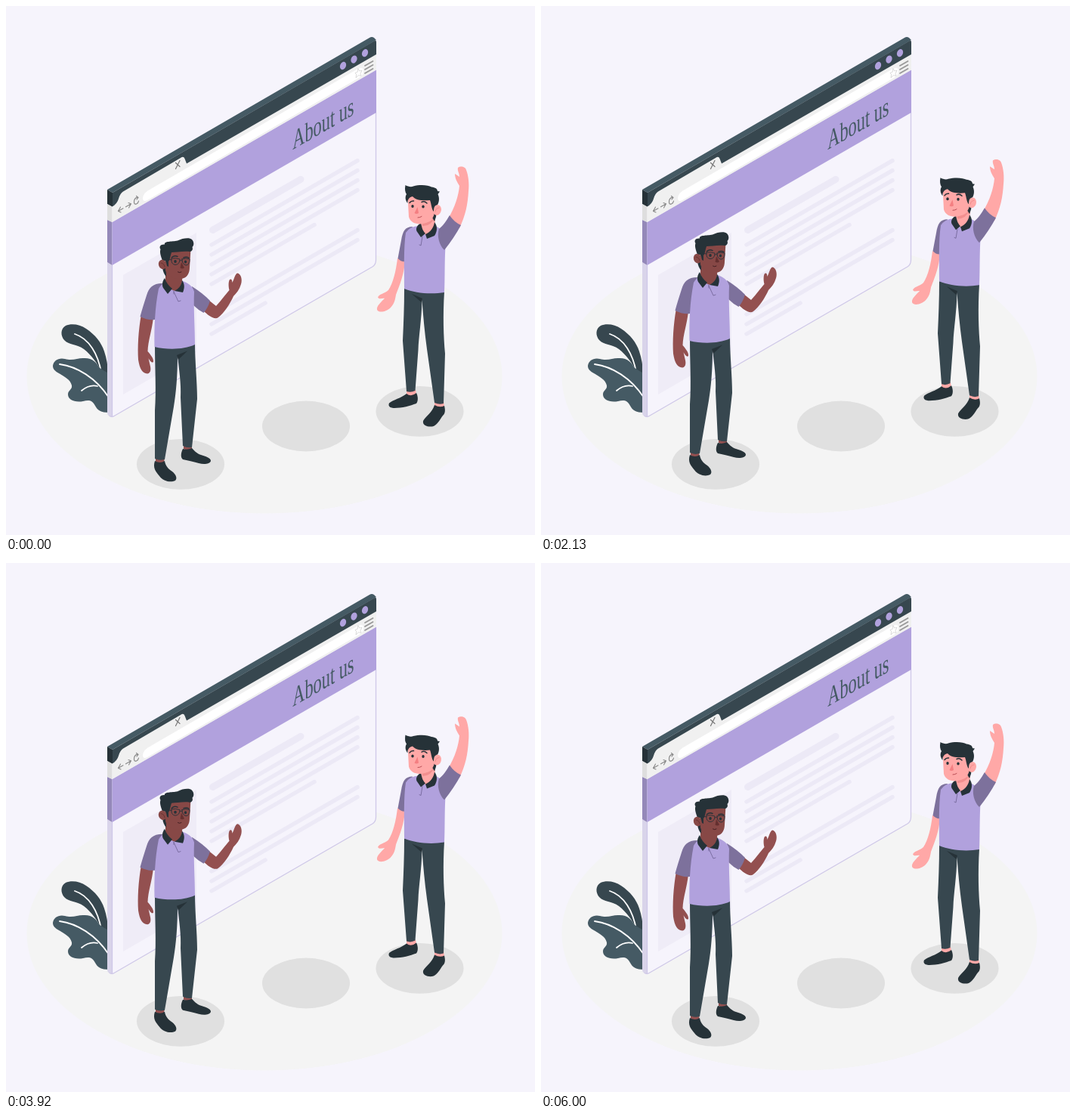
Animation of 700 by 700 pixels, one loop 6.04 s. Source, as an HTML page with a canvas:

```html
<!DOCTYPE html>
<html lang="en">
<head>
<meta charset="utf-8">
<title>About us</title>
<style>
html, body { margin: 0; width: 100%; height: 100%; overflow: hidden; background: #f6f4fc; }
canvas { display: block; width: 700px; height: 700px; }
</style>
</head>
<body>
<canvas id="stage"></canvas>
<script>
const canvas = document.getElementById('stage');
const ctx = canvas.getContext('2d');
const ratio = window.devicePixelRatio || 1;
canvas.width = canvas.height = 700 * ratio;

const LOOP = 6040, CYCLE = 6000, LIFT = 13.6;
const SLOPE = 0.577; // isometric edge
const C = {
  bg: '#f6f4fc', floor: '#f4f4f4', shadow: '#e0e0e0',
  lilac: '#b1a1dd', sleeve: '#7d719c', side: '#9488b9', pale: '#ece9f6',
  ink: '#263238', slate: '#37474f', steel: '#455a64',
  brown: '#874846', arm: '#935050', pink: '#ffa8a7'
};

const cache = new Map();
function path(d) {
  if (!cache.has(d)) cache.set(d, new Path2D(d));
  return cache.get(d);
}
function fill(color, d) {
  ctx.fillStyle = color;
  ctx.fill(path(d));
}
function line(color, width, d) {
  ctx.strokeStyle = color;
  ctx.lineWidth = width;
  ctx.lineCap = ctx.lineJoin = 'round';
  ctx.stroke(path(d));
}
function oval(color, x, y, rx, ry, turn = 0) {
  ctx.fillStyle = color;
  ctx.beginPath();
  ctx.ellipse(x, y, rx, ry, turn, 0, Math.PI * 2);
  ctx.fill();
}

function floor() {
  ctx.fillStyle = C.bg;
  ctx.fillRect(0, 0, 700, 700);
  oval(C.floor, 342, 490, 314.5, 181.5);
  for (const [x, y] of [[231, 606.3], [397, 556], [547.5, 536.3]]) oval(C.shadow, x, y, 58, 33.4);
}

function plant() {
  fill(C.slate, 'M135 487L126 485C121 472 113 462 103 454C94 447 83 449 77 442C72 436 72 427 79 423C86 420 98 421 106 427C118 435 126 445 130 457C133 466 135 476 135 487Z');
  line('#fff', 1.8, 'M91 434C110 440 122 461 126 485');
  fill(C.steel, 'M62 476C63 469 70 465 78 467C88 470 94 466 102 466C114 465 120 472 123 478C128 482 132 484 136 486V538C126 538 121 535 118 529C114 521 109 521 102 523C91 525 82 521 82 514C82 508 88 508 87 502C85 494 78 491 70 486C65 483 62 481 62 476Z');
  line('#fff', 1.8, 'M71 474C94 477 119 492 136 518');
  line('#fff', 1.8, 'M100 509C106 504 113 501 121 503');
}

function bar(x, y, x2, width) {
  line(C.pale, width, `M${x} ${y}L${x2} ${y - (x2 - x) * SLOPE}`);
}

function screen() {
  // page
  fill('#d9d4ea', 'M134 339L140.5 343V544.5L136 542Q134 541 134 538Z');
  fill(C.bg, 'M140.5 343L490 141V336Q490 342 485 345L140.5 544Z');
  line('#cfc8e8', 1.3, 'M489.5 141V336Q489.5 342 485 345L144 542Q140.5 544.5 137 542.5M140.500 343V543');

  // header
  fill(C.side, 'M134 283L140.5 286V343L134 339Z');
  fill(C.lilac, 'M140.5 286L490 84.5V141L140.5 343Z');

  // frame
  fill(C.steel, 'M134 243L481 42Q484 40 487 42L490 45L141 247Z');
  fill(C.ink, 'M134 243L141 247V266L134 262Z');
  fill(C.slate, 'M141 247L487 46.5Q490 44.5 490 48V65L141 267Z');
  [446, 460.5, 475].forEach((x, i) => oval(C.lilac, x, 79 - i * 8.4, 3.9, 5.3, 0.4));

  // toolbar
  fill('#dedede', 'M134 262L140.5 265.5V286L134 283Z');
  fill('#f0f0f0', 'M140.5 265.5Q147 262 149 255Q151 248 155 245.5L231 201Q235 198 236.5 202L239 208.6L490 64V84.5L140.5 286Z');
  fill('#fff', 'M190 243L466 83Q473 80 473 86Q473 91 468 94.5L187 257Q181 260 181 254Q182 247 190 243Z');
  line('#777', 1.2, 'M224.5 207.5L230 212.5M230 204.5L224.5 215.5');
  line('#888', 1.1, 'M148.5 271.5L155 267.8M151.5 266L148.5 271.5L152 273M158.5 265.8L165.5 261.8M162 260.5L165.5 261.8L162.5 267');
  line('#888', 1.2, 'M174.5 253.5C171 253 169 257 169.5 260C170 264 175 262 175.5 258M172.5 251.5L175 253.5L173 256');
  line('#d2d2d2', 0.8, 'M466 83L467.8 86L471 85.4L469 89.5L470 92.3L466.4 91.8L463 95L463.7 90.8L462 88.6L465 87.3Z');
  for (let y = 79; y < 92; y += 5) line('#999', 1.8, `M475 ${y}L485.5 ${y - 6}`);

  ctx.save();
  ctx.transform(0.62, -0.358, 0, 1, 379.3, 190.3);
  ctx.font = '36px "Liberation Serif", "Times New Roman", serif';
  ctx.fillStyle = C.steel;
  ctx.fillText('About us', 0, 0);
  ctx.restore();

  // content
  fill('#efecf7', 'M155 356L252 300V458L155 514Z');
  bar(273.5, 296.5, 390, 9);
  for (let i = 0; i < 5; i++) bar(272, 316 + i * 13, i < 4 ? 465 : 408, 5.4);
  for (let i = 0; i < 3; i++) bar(272, 408 + i * 13, i < 2 ? 465 : 343, 5.4);
}

function leftMan() {
  // legs
  fill(C.arm, 'M198 596H210L209 604Q203 606 198 603ZM235 579H246L246 587Q240 589 235 586Z');
  fill(C.ink, 'M197 602C194 611 198 616 203 622C208 629 218 631 224 628C227 625 225 620 220 616C214 612 211 608 210 602Q204 606 197 602Z');
  fill(C.ink, 'M234 586C231 592 231 598 234 600C242 602 249 603 255 605C262 607 270 606 271 602C271 598 264 596 258 594C252 592 249 588 246 585Q240 588 234 586Z');
  fill(C.slate, 'M197 449L250 446C250 470 253 498 253 520L246 584Q239 585 234 582L231 518C232 500 229 482 227 462C227 490 225 512 222 530L210 600Q203 602 197 599L197 535C199 510 197 478 197 449Z');
  fill(C.ink, 'M226 462L240 456.5L228 468Z');

  // arms
  fill(C.arm, 'M179 408C175 430 174 452 175 468C177 480 180 486 187 486.5C191 486 192 482 191 477L188.5 466C190 469 193 473 195 471C196 467 191 461 187.5 457C188 443 193 430 195 412Z');
  fill(C.sleeve, 'M207 367C194 367 189 373 186 383C183 392 180 402 177.5 411Q187 416 197 415L204 400Z');
  fill(C.arm, 'M268 389L278 397C286 388 291 381 295.5 376C294 370 294.5 364 296 362Q299 360 299.5 366C302 361 303 355 306 353.5C311 354 313 362 311 368C309 375 305 380 301 384C296 395 288 407 281 412C276 416 267 409 262 404Z');
  fill(C.sleeve, 'M246 371C256 377 264 384 270 390Q267 400 261.5 406Q254 402 248 396Z');

  // shirt
  fill(C.lilac, 'M196.5 451C196 425 197 399 202 374Q206 367 213 364L234 364C242 367 247 371 249 378C248 400 250 425 250 448C235 455 213 455 196.5 451Z');
  fill(C.brown, 'M211 349V364C214 373 220 377 225 377C231 374 234 369 233 356Z');
  fill(C.ink, 'M210 360C207 364 206 369 208 373L214 381L220 374C215 370 212 366 210 360ZM233 363C236 367 237 372 234 379L223 377C229 374 232 370 233 363Z');
  line('#75689b', 0.9, 'M222 378L228 391L231 390M222 377L222 381');

  // head
  fill(C.ink, 'M207 346L212 346L212 358Q208 354 207 346Z');
  fill(C.brown, 'M210 326L211 350C213 358 222 362 232 361C240 360 243 353 243 346L244.5 321L222 317Z');
  fill(C.ink, 'M207 337C205 331 203 326 204.5 322C202 318 205 315 210 315.5C209 311 219 312 227 310.5C234 307 243 306 246 309C249 312 249 317 246.5 319C248 323 245 325 243 325C234 324 225 326 219 326C217 332 217 336 215 338V345C212 344 212 341 211 337Z');
  oval(C.brown, 207.2, 342, 5.3, 6.3, -0.3);
  line('#5f2f2f', 0.8, 'M205 340Q209 340 210 345');
  line(C.ink, 1.5, 'M219.5 332.5Q223 329.5 227 331.5M235 333Q239 331.5 242 333.5');
  oval(C.ink, 224, 338, 1.8, 2);
  oval(C.ink, 237.5, 338.5, 1.6, 2);
  line(C.ink, 0.9, 'M219 334Q225 333 230 335Q230 342 224 342.5Q218 342 219 334ZM233 335Q238 333 243 335Q243 343 238 343Q233 342 233 335ZM230 337Q231.5 336 233 337M219 336L212 334.5');
  fill('#642f2f', 'M232 339L236 346.5Q233 348.5 230.5 346.5Z');
  line('#421f22', 1, 'M227.5 352Q229.5 353.5 232 352');
}

function rightMan() {
  // legs
  fill(C.pink, 'M530 508H542L543 514Q536 519 530 514ZM567 523H579L580 530Q573 533 567 529Z');
  fill(C.ink, 'M530 513C523 519 512 521 507 525.5C505 530 509 532 514 532C524 532 535 529 543 526C546 522 545 516 543 512Q536 518 530 513Z');
  fill(C.ink, 'M567 528C564 538 556 542 552 549C551 555 557 557 564 556.5C571 555 574 547 578 542C582 539 581 533 580 529Q574 532 567 528Z');
  fill(C.slate, 'M527 374L580 378C578 410 579 438 581 460L579 526Q573 528 567 525L557 454C554 432 552 410 550.5 389C550 415 546 438 545.5 455L541.5 509Q536 512 530 510L525 443C526 420 527 398 527 374Z');
  fill(C.ink, 'M537 381L551 387L549.5 392Z');

  // arms
  fill(C.pink, 'M518 334C516 351 512 367 506 376C500 381 494 381 492 385.5C494 389 499 386 501 387C497 391 490 397 491 402C494 407 504 404 509 399C514 394 515 388 516 382C521 369 527 355 528 336Z');
  fill(C.sleeve, 'M538 292C528 292 525 298 523 310L518.5 334Q523 339 529 338L534 310Z');
  fill(C.lilac, 'M527 374C527 348 526 320 529 300Q534 292 545 291H568C575 294 580 300 582 311C580 335 581 359 580 379C562 382 541 380 527 374Z');
  fill(C.pink, 'M585 281C594 267 599 250 600 238C597 233 594 228 594 222L600 226C600 221 597 218 598 214C602 211 608 213 609 217C612 225 613 235 612 245C611 263 608 277 600 294Z');
  fill(C.sleeve, 'M573 295C578 291 583 284 587 277Q593 286 602 290C596 301 588 313 580 323C573 316 570 304 573 295Z');

  // collar
  fill(C.pink, 'M549 278V292C551 300 555 304 558 303C564 300 568 294 568 280Z');
  fill('#f28f8f', 'M551 287.5Q561 287 567 280Q562 292 551 291Z');
  fill(C.ink, 'M549 287C544 290 542 294 543.5 298L549 306L555 301C551 297 550 292 549 287ZM567 286C571 291 571 298 567 304L557 308L555 302C562 299 566 293 567 286Z');
  line('#75689b', 0.9, 'M551 305L549 317L547 316');

  // head
  fill(C.ink, 'M564 260L571 264L569 279L567 285L564 280Z');
  fill(C.pink, 'M531.5 251L533 279C535 287 544 289.5 552 288C562 286 567 280 567 271L569 248L542 244Z');
  oval(C.pink, 570.5, 270, 5.4, 7, 0.25);
  line('#ee8585', 0.8, 'M568 272Q569 267 573 267');
  fill(C.ink, 'M528.5 237C532 239 536 240 539 238.5C548 236 559 237 563 239.5C568 240 571 242 571 245L574 245.5L571.5 249C574 254 573 260 571 263C567 263 566 267 566 272C563 269 563 262 561 257C552 258 542 257 538 252C533 253 531 257 531.5 261C528 257 528 252 530 249Q527 245 528.5 237Z');
  line(C.ink, 1.5, 'M534 260.5Q536 257.5 539.5 258M550 259.5Q553.5 257.5 557 261');
  oval(C.ink, 538, 265, 1.7, 2);
  oval(C.ink, 552, 265.5, 1.7, 2);
  fill('#f47f82', 'M544.5 266L540.5 274Q543 276 546 274Z');
  line('#b94d55', 1, 'M545 280Q548 280 550 278.5');
}

// straight rise and fall, 0..1..0
function bounce(t, period) {
  return 1 - Math.abs(1 - 2 * (t % period) / period);
}

function lifted(draw, amount) {
  ctx.save();
  ctx.translate(0, -LIFT * amount);
  draw();
  ctx.restore();
}

const start = performance.now();
function frame() {
  const t = Math.min(Math.max(0, performance.now() - start) % LOOP, CYCLE);
  ctx.setTransform(ratio, 0, 0, ratio, 0, 0);
  floor();
  plant();
  screen();
  lifted(rightMan, bounce(t, CYCLE));
  lifted(leftMan, bounce(t, CYCLE / 2));
  requestAnimationFrame(frame);
}
frame();
</script>
</body>
</html>
```
